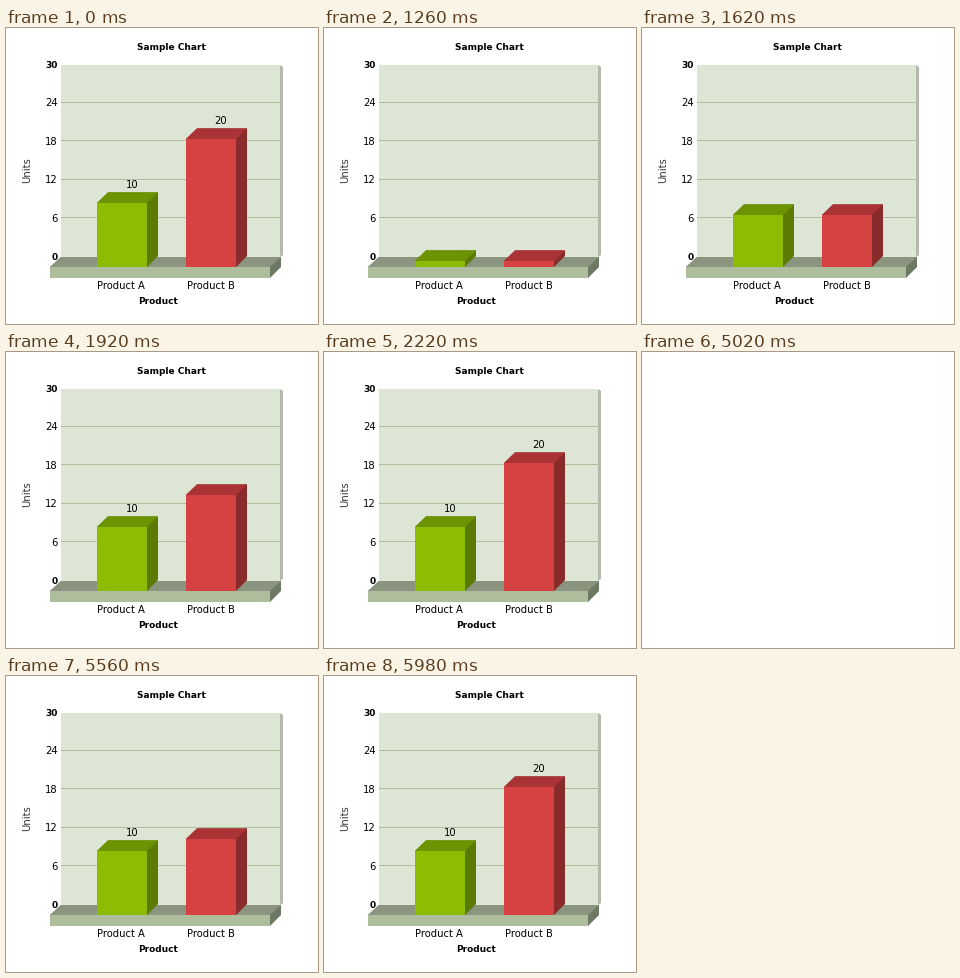
A matplotlib script for the animation above (6.58 s loop, 312 by 296 pixels).

```python
import numpy as np
import matplotlib.pyplot as plt
from matplotlib.animation import FuncAnimation
from matplotlib.patches import Polygon

W, H, DPI = 312, 296, 100
TICK = 20            # ms per drawn frame
LOOP = 6580
STEP = 60            # ms per growth step
BASE = 239           # bottom edge of the bars
DX, DY = 11, 11      # depth offset of the 3D look
RUNS = [
    (5020, [1, 9, 10, 15], [8, 76, 84, 128]),
    (1260, [0, 6, 10, 15], [6, 52, 88, 128]),
]

fig = plt.figure(figsize=(W / DPI, H / DPI), dpi=DPI, facecolor="white")
ax = fig.add_axes([0, 0, 1, 1])
ax.set_xlim(0, W)
ax.set_ylim(H, 0)
ax.axis("off")


def poly(points, color, z):
    return ax.add_patch(Polygon(points, closed=True, facecolor=color,
                                linewidth=0, zorder=z))


def box(x0, y0, x1, y1, color, z):
    return poly([(x0, y0), (x1, y0), (x1, y1), (x0, y1)], color, z)


def label(x, y, s, px=10, bold=False, ha="center", color="black", **kw):
    return ax.text(x, y, s, fontsize=px * 72 / DPI, family="DejaVu Sans",
                   weight="bold" if bold else "normal", ha=ha,
                   va=kw.pop("va", "baseline"), color=color, zorder=9, **kw)


class Bar:
    def __init__(self, x, width, full, text, front, top, side):
        self.x0, self.x1, self.full = x, x + width, full
        blank = [(0, 0)] * 3
        self.side = poly(blank, side, 5)
        self.top = poly(blank, top, 6)
        self.front = poly(blank, front, 7)
        self.text = label(x + 35, BASE - full - 14.5, text)

    def draw(self, height, done):
        a, b = self.x0, self.x1
        y = BASE - min(height, self.full)
        back = y - DY + 0.4
        self.side.set_xy([(a, y), (a + DX, back), (b + DX, back),
                          (b + DX, BASE - DY), (b, BASE), (a, BASE)])
        self.top.set_xy([(a, y), (a + DX, back), (b + DX, back), (b, y)])
        self.front.set_xy([(a, y), (b, y), (b, BASE), (a, BASE)])
        self.text.set_visible(done)


# back wall with its edge and grid
poly([(274, 37), (277, 39), (277, 227), (274, 229)], "#b5b8aa", 1)
box(55, 37, 274, 229, "#dde6d5", 1)
for k in range(1, 5):
    y = round(36.5 + 38.4 * k)
    box(55, y - 1, 274, y, "#b2bd9b", 2)

# floor slab
poly([(44, 239), (55, 229), (275, 229), (275, 239), (264, 250), (44, 250)],
     "#6e7964", 3)
poly([(44, 239), (55, 229), (275, 229), (264, 239)], "#8a947f", 3.1)
box(44, 239, 264, 250, "#aebd9c", 3.2)

# fixed text
label(165, 22, "Sample Chart", 9, True)
label(152.5, 276, "Product", 9, True)
label(115, 261, "Product A")
label(204.5, 261, "Product B")
label(21.5, 142, "Units", rotation=90, va="center", color="#333333")
for k in range(6):
    end = k in (0, 5)
    label(52, 40 + 38.4 * k, str(30 - 6 * k), 9 if end else 10, end, "right")

bars = [
    Bar(91, 50, 64, "10", "#8cbd02", "#6c9300", "#5a7b00"),
    Bar(180, 50, 128, "20", "#d64242", "#aa3435", "#8a2b2b"),
]


def draw(i):
    ms = i * TICK
    steps, heights, k = [0, 1], [128, 128], 99
    for start, xs, ys in RUNS:
        if ms >= start:
            steps, heights, k = xs, ys, (ms - start) // STEP
            break
    ax.set_visible(k >= steps[0])
    now, before = np.interp([k, k - 1], steps, heights)
    for bar in bars:
        bar.draw(round(now), before >= bar.full)
    return []


anim = FuncAnimation(fig, draw, frames=LOOP // TICK, interval=TICK,
                     init_func=lambda: draw(0), repeat=True, repeat_delay=0,
                     blit=False, cache_frame_data=False)
plt.show()
```
